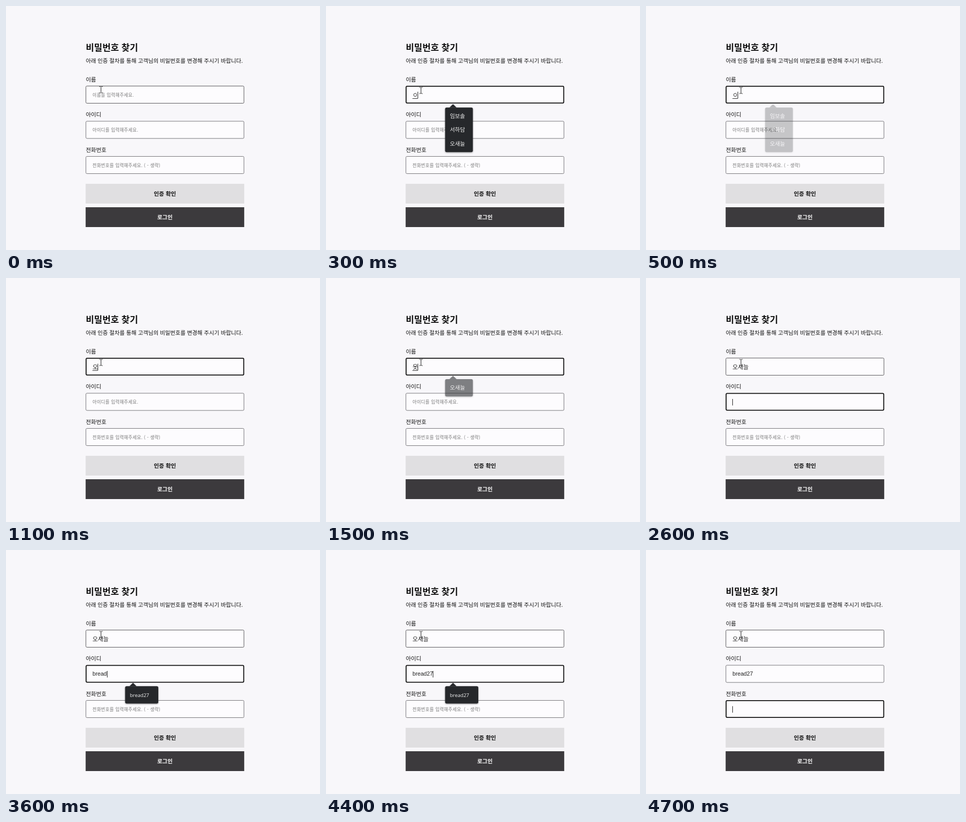
An HTML page that plays this animation: 600x468 px, repeating every 5 s.

```html
<!DOCTYPE html>
<html lang="ko">
<head>
<meta charset="utf-8">
<style>
html, body { margin: 0; width: 100%; height: 100%; overflow: hidden; background: #f8f7fa; }
svg { display: block; width: 600px; height: 468px; }
text { font-family: "Noto Sans CJK KR", "Noto Sans CJK", sans-serif; white-space: pre; }
.latin { font-family: "Liberation Sans", Arial, sans-serif; }
.ui { font-family: "Open Sans", "Noto Sans", sans-serif; }
.hint { letter-spacing: .3px; }
.popup { filter: drop-shadow(0 1px 1.5px rgba(0, 0, 0, .4)); }
</style>
</head>
<body>
<svg id="stage" viewBox="0 0 600 468"></svg>
<script>
const LOOP = 5000, STEP = 100, FADE = 200;
const LEFT = 152.2, WIDTH = 303, PAD = 13;
const INK = '#111';
const NAME = '오새늘', ID = 'bread27';
const stage = document.getElementById('stage');

function set(el, attrs) {
  for (const k in attrs) el.setAttribute(k, attrs[k]);
}
function add(tag, attrs, parent = stage) {
  const el = document.createElementNS('http://www.w3.org/2000/svg', tag);
  set(el, attrs);
  parent.appendChild(el);
  return el;
}
function label(str, x, y, size, attrs = {}, parent = stage) {
  const el = add('text', { x, y, 'font-size': size, fill: INK, ...attrs }, parent);
  el.textContent = str;
  return el;
}

// Spreads a run of input states evenly between two times.
function burst(states, from, to) {
  const gap = (to - from) / (states.length - 1);
  return states.map((str, i) => ({ time: from + i * gap, str }));
}
const prefixes = (s, from, to) =>
  Array.from({ length: to - from + 1 }, (_, i) => s.slice(0, from + i));

function makeField(index, title, hint, focusAt, keys, latin) {
  const y = 153 + index * 67.5;
  label(title, 152.5, y - 8.2, 10.7);
  return {
    y, focusAt, keys, latin,
    box: add('rect', { fill: '#fdfcfe', rx: 2 }),
    hint: label(hint, LEFT + PAD, y + 20.8, 8.6, { fill: '#777', class: 'hint' }),
    value: label('', LEFT + PAD, y + (latin ? 20.7 : 22), latin ? 10.7 : 11.2,
      { fill: '#222', class: latin ? 'latin' : '' }),
    line: add('rect', { y: y + 24, height: 1, fill: '#333' }),
    caret: add('rect', { y: y + 11.5, width: 1, height: 12.5, fill: '#222' })
  };
}

function button(str, y, fill, color) {
  add('rect', { x: LEFT, y, width: WIDTH, height: 38, fill });
  label(str, 303.7, y + 22.5, 10.7, { 'text-anchor': 'middle', 'font-weight': 700, fill: color });
}

// Each span is the time the list opens and the time it starts to fade.
function makePopup(items, y, width, spans, cls = '') {
  const row = 26.2, h = 33.2 + (items.length - 1) * row;
  const g = add('g', { class: 'popup', fill: '#26282b' });
  add('rect', { x: 227.6, y, width, height: h, rx: 3 }, g);
  add('path', { d: `M236 ${y}l6.7 -6.5l6.7 6.5z` }, g);
  items.forEach((str, i) => label(str, 236.7, y + 20.4 + i * row, cls ? 9.5 : 10.5,
    { fill: '#f0f0f0', class: cls }, g));
  return { g, spans };
}

add('rect', { width: 600, height: 468, fill: '#f8f7fa' });
label('비밀번호 찾기', 152.5, 85.5, 17.2, { 'font-weight': 700 });
label('아래 인증 절차를 통해 고객님의 비밀번호를 변경해 주시기 바랍니다.', 152.5, 108.8, 10.62);

const fields = [
  makeField(0, '이름', '이름을 입력해주세요.', 100, [
    ...burst(['ㅇ', '오'], 300, 1100),
    ...burst(['옷', '오새', '오샌', '오새느', NAME], 1500, 2000)
  ]),
  makeField(1, '아이디', '아이디를 입력해주세요.', 2100, [
    ...burst(prefixes(ID, 1, 5), 3000, 3600),
    ...burst(prefixes(ID, 6, 7), 4200, 4400)
  ], true),
  makeField(2, '전화번호', '전화번호를 입력해주세요. ( - 생략)', 4500, [], true)
];
button('인증 확인', 341, '#e0dfe1', INK);
button('로그인', 386, '#3c3a3d', '#fff');

const popups = [
  makePopup(['임보솔', '서하담', NAME], 194.7, 53, [[100, 350]]),
  makePopup([NAME], 194, 53, [[1100, 1415], [1600, 1715]]),
  makePopup([ID], 261.2, 63.4, [[3000, 4450]], 'ui')
];
const pointer = add('path', {
  d: 'M178.5 .5h2l1 1l1-1h2M181.5 1.5v10M178.5 12.5h2l1-1l1 1h2',
  fill: 'none', stroke: '#222'
});

function fade(t, [open, close]) {
  const level = Math.min(t - open, close + FADE - t) / FADE;
  return Math.max(0, Math.min(1, level));
}

function drawField(f, t, focused, hovered) {
  const key = f.keys.filter(k => k.time <= t).pop();
  const str = key ? key.str : '';
  const w = focused ? 1.8 : 1;
  set(f.box, {
    x: LEFT + w / 2, y: f.y + w / 2, width: WIDTH - w, height: 34 - w,
    stroke: focused ? INK : hovered ? '#5a595c' : '#77767a', 'stroke-width': w
  });
  f.value.textContent = str;
  set(f.hint, { opacity: str || (focused && !hovered) ? 0 : 1 });

  const end = LEFT + PAD + (str ? f.value.getComputedTextLength() : 0);
  const idle = t - Math.max(f.focusAt, key ? key.time : 0);
  set(f.caret, { x: Math.round(end), opacity: focused && idle % 1000 < 600 ? 1 : 0 });

  // Underline the syllable still being composed.
  const composing = focused && str && !f.latin;
  const width = composing ? f.value.getSubStringLength(str.length - 1, 1) : 0;
  set(f.line, { x: end - width, width });
}

function draw(time) {
  const t = Math.floor((time % LOOP) / STEP) * STEP;
  const active = fields.filter(f => f.focusAt <= t).length - 1;
  fields.forEach((f, i) => drawField(f, t, i === active, i === 0));
  for (const p of popups) {
    set(p.g, { opacity: Math.max(...p.spans.map(s => fade(t, s))) });
  }
  set(pointer, { transform: `translate(0 ${active < 0 ? 154 : 155.5})` });
}

function tick(now) {
  draw(now);
  requestAnimationFrame(tick);
}
draw(0);
requestAnimationFrame(tick);
</script>
</body>
</html>
```
